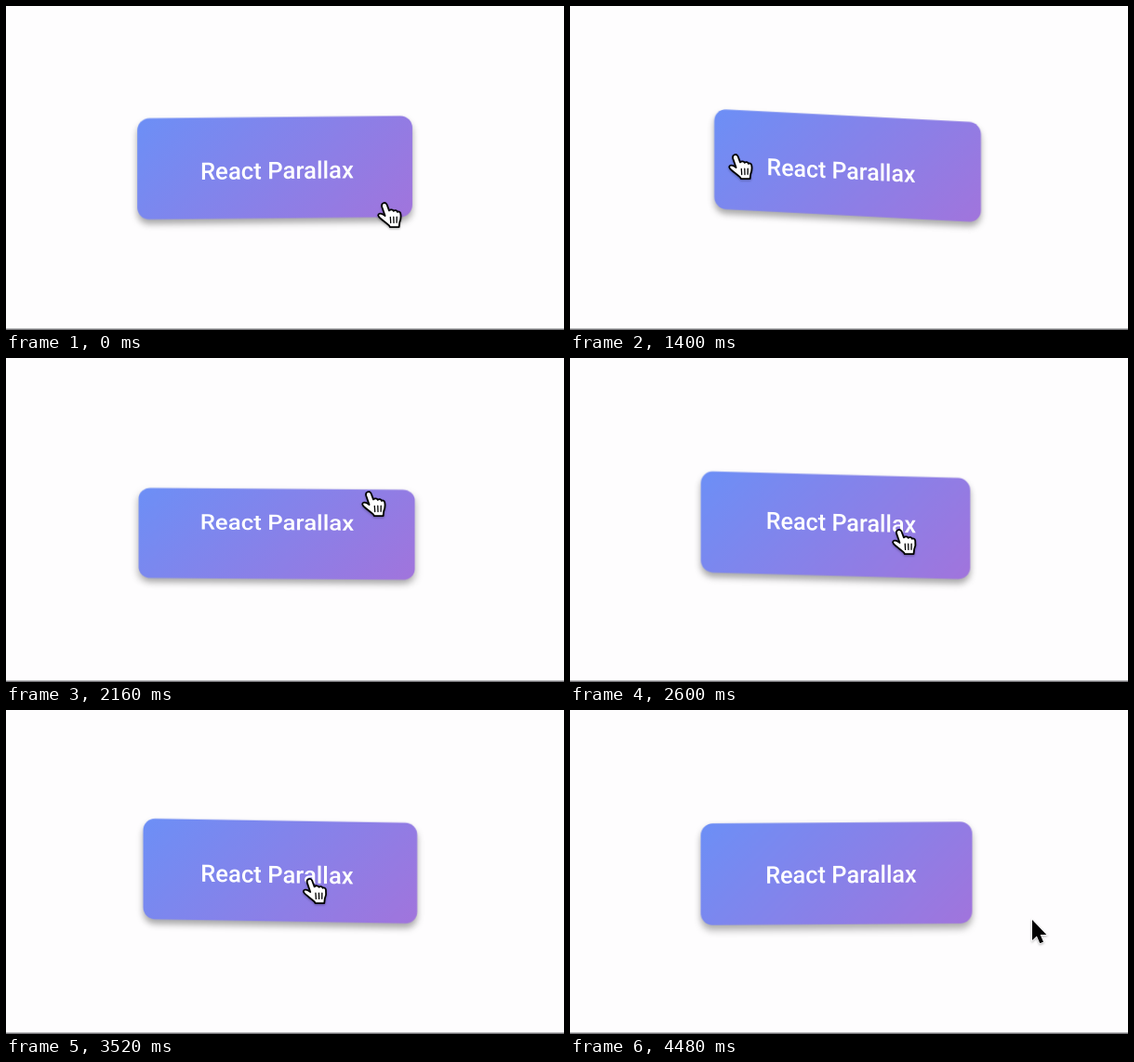
An HTML page for the animation above (4520 ms loop, 600 px wide and 349 px high).

```html
<!DOCTYPE html>
<html lang="en">
<head>
<meta charset="utf-8">
<title>Parallax button</title>
<style>
  html, body { margin: 0; width: 100%; height: 100%; overflow: hidden; background: #fefdfe; }
  svg { display: block; width: 600px; height: 349px; }
  text { font: 500 25.8px Roboto, Arial, sans-serif; fill: #fff; text-anchor: middle; }
  filter { color-interpolation-filters: sRGB; }
</style>
</head>
<body>
<svg viewBox="0 0 600 349">
  <defs>
    <linearGradient id="fill" gradientUnits="userSpaceOnUse" x1="-102" y1="-102" x2="102" y2="102">
      <stop offset="0" stop-color="#6c8ff6"/>
      <stop offset="1" stop-color="#a174dc"/>
    </linearGradient>
    <filter id="cardShadow" x="-10%" y="-20%" width="120%" height="150%">
      <feDropShadow dx="0" dy="5" stdDeviation="4" flood-color="#000" flood-opacity=".34"/>
    </filter>
    <filter id="cursorShadow" x="-40%" y="-40%" width="180%" height="180%">
      <feDropShadow dx="0" dy="1.2" stdDeviation="1" flood-color="#000" flood-opacity=".3"/>
    </filter>
  </defs>
  <rect width="600" height="349" fill="#fefdfe"/>
  <rect y="347.5" width="600" height="1.5" fill="#77767a"/>
  <rect id="card" filter="url(#cardShadow)" x="-148.5" y="-54.75" width="297" height="109.5" rx="13" fill="url(#fill)"/>
  <text id="label" y="9.2">React Parallax</text>
  <g id="hand" filter="url(#cursorShadow)" stroke="#000" stroke-linejoin="round" stroke-linecap="round">
    <path fill="#fff" stroke-width="1.8" d="M-2.8 3.2C-4-.8 1-2.6 2.6 1L5 7.4C6.2 5.8 9 6 9.8 7.8C11 6.6 13.2 7 13.9 8.8
      C15.4 8 17 8.8 17.3 10.8C17.9 14.5 17.6 17 16.2 20L15.6 25.2H6C5 22.5 1.5 21-1.5 18.2
      C-4 16-6.4 14.6-6.8 12.6C-6.8 10.4-4 10-1.6 11.6L.6 13Z"/>
    <path fill="none" stroke-width="1.3" d="M6.3 14.3L6.7 20.5M9.8 14.2L10 20.5M13.2 14.1L13.1 20.3"/>
  </g>
  <path id="arrow" filter="url(#cursorShadow)" fill="#000" stroke="#fff" stroke-width="1.5" paint-order="stroke"
    d="M0 0V22L4.9 17.4L8.3 25.3L12 23.7L8.7 16H15.3Z"/>
</svg>
<script>
const LOOP = 4520, STEP = 40;
const LAG = 240;      // the card trails the pointer by this much
const LEAVE = 3700;   // the card stops following here
const CENTER = { x: 291.5, y: 177 };
const DEPTH = 27;     // distance of the card behind the label
const TURN = { x: .0018, y: .0118 };   // tilt per pixel from the centre

// The pointer circles the button: time, x, y
const PATH = [
  [-240, 341, 186], [0, 407, 213], [520, 314, 212], [760, 227, 212],
  [1160, 147, 193], [1400, 178, 161], [1920, 300, 138], [2160, 390, 145],
  [2520, 395, 183], [2840, 180, 186], [3080, 155, 191],
  [3700, 394, 180], [3920, 413, 182], [4480, 497, 226]
];
const LAST = PATH.length - 1;

const byId = id => document.getElementById(id);
const card = byId('card'), label = byId('label'), hand = byId('hand'), arrow = byId('arrow');

function slope(i, axis) {
  const a = PATH[Math.max(i - 1, 0)], b = PATH[Math.min(i + 1, LAST)];
  return (b[axis] - a[axis]) / (b[0] - a[0]);
}

// Smooth curve through the path points
function pointer(t) {
  const next = PATH.findIndex(point => point[0] > t);
  const i = (next < 0 ? LAST : next) - 1;
  const a = PATH[i], b = PATH[i + 1], span = b[0] - a[0];
  const u = Math.min((t - a[0]) / span, 1), ease = u * u * (3 - 2 * u);
  const at = axis => a[axis] + (b[axis] - a[axis]) * ease
    + span * u * (1 - u) * (slope(i, axis) * (1 - u) - slope(i + 1, axis) * u);
  return { x: at(1), y: at(2) };
}

function render(t) {
  const now = pointer(t), past = pointer(Math.min(t - LAG, LEAVE));
  const p = (CENTER.x - past.x) * TURN.x, q = (CENTER.y - past.y) * TURN.y;
  const tilt = [Math.sqrt(1 - p * p), -p * q, 0, Math.sqrt(1 - q * q)];
  const place = (el, x, y) => el.setAttribute('transform', `matrix(${[...tilt, x, y]})`);
  const cardX = CENTER.x + DEPTH * p;
  place(card, cardX, CENTER.y + DEPTH * q);
  place(label, CENTER.x, CENTER.y);

  const overCard = now.x < cardX + 148.5 * tilt[0];
  hand.style.display = overCard ? '' : 'none';
  arrow.style.display = overCard ? 'none' : '';
  (overCard ? hand : arrow).setAttribute('transform', `translate(${now.x} ${now.y})`);
}

const start = performance.now();
function tick() {
  const t = Math.max(performance.now() - start, 0) % LOOP;
  render(Math.floor(t / STEP) * STEP);
  requestAnimationFrame(tick);
}
tick();
</script>
</body>
</html>
```
